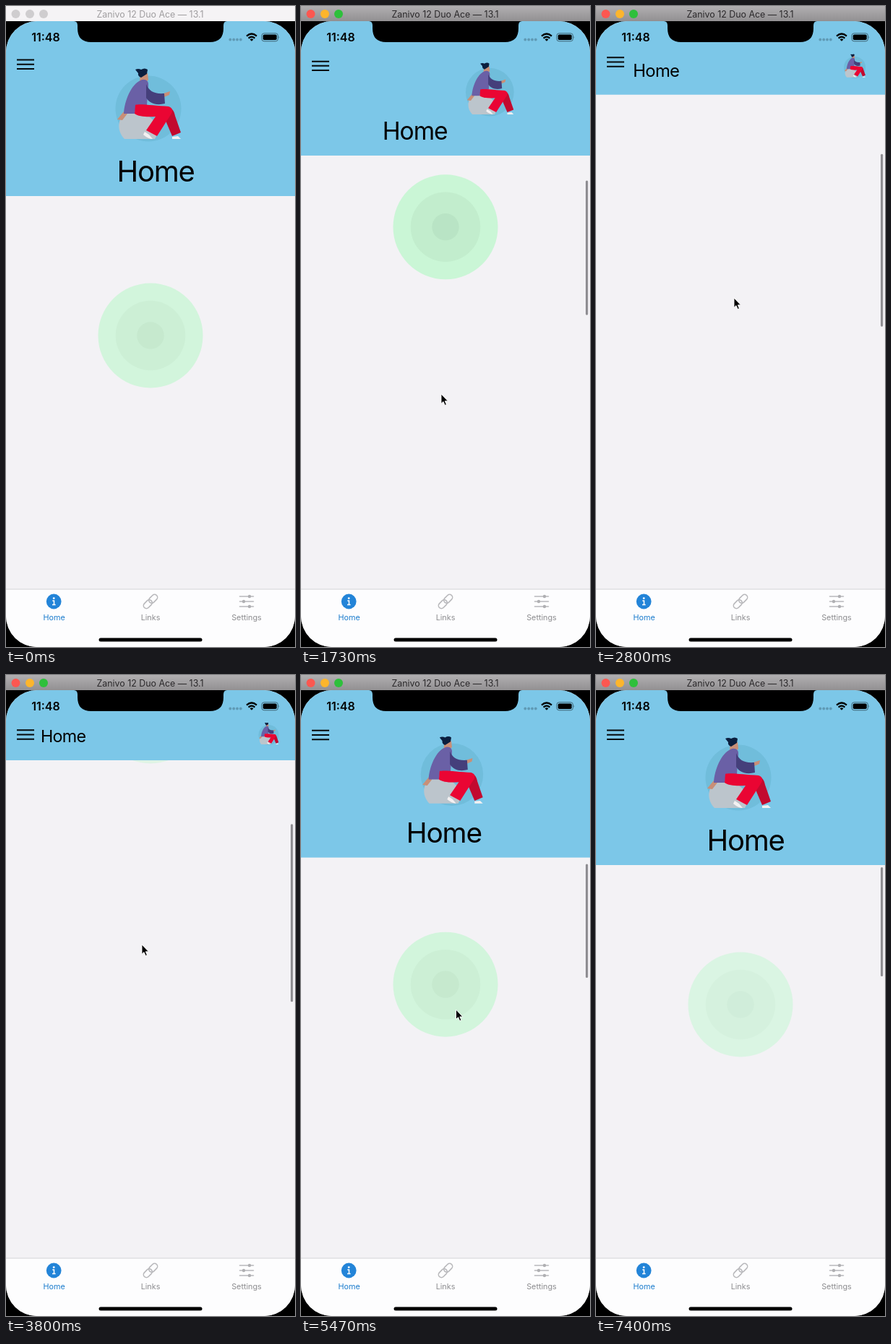
An HTML page for the animation above (7470 ms loop, 400x887 px).

```html
<!DOCTYPE html>
<html lang="en">
<head>
<meta charset="utf-8">
<title>Collapsing header</title>
<style>
  html, body { margin: 0; width: 100%; height: 100%; overflow: hidden; background: #000; }
  svg { display: block; width: 100vw; height: 100vh; font-family: Inter, Roboto, sans-serif; }
  .mid { text-anchor: middle; }
  .tab { font-size: 10.8px; fill: #8c8c8f; }
  .line { fill: none; stroke: #b9b9bc; stroke-width: 1.6; stroke-linecap: round; }
</style>
</head>
<body>
<svg viewBox="0 0 400 887">
  <defs>
    <clipPath id="screen"><rect y="21" width="400" height="866" rx="43"/></clipPath>
    <linearGradient id="chrome" x2="0" y2="1">
      <stop stop-color="#b1afb1"/><stop offset="1" stop-color="#929092"/>
    </linearGradient>
  </defs>

  <!-- window title bar -->
  <rect id="bar" width="400" height="21"/>
  <g id="lights">
    <circle cx="13.5" cy="11" r="6"/><circle cx="33" cy="11" r="6"/><circle cx="52" cy="11" r="6"/>
  </g>
  <text id="caption" class="mid" x="199.5" y="15.5" font-size="12.4">Zanivo 12 Duo Ace — 13.1</text>

  <g clip-path="url(#screen)">
    <rect y="21" width="400" height="866" fill="#f3f2f5"/>
    <g id="pulse">
      <circle cx="200" fill="#96faaf"/>
      <circle cx="200" fill="#6e8c73"/>
      <circle cx="200" fill="#4b7359"/>
    </g>
    <rect id="thumb" x="394" width="3.2" rx="1.6" fill="#8f8e92"/>

    <!-- header -->
    <rect id="header" y="21" width="400" fill="#7cc7e8"/>
    <g id="art">
      <circle cx="197" cy="142" r="45.5" fill="#70bddb"/>
      <path fill="#bcc5cc" d="M164 184C152 172 154 152 170 147L195 151C210 160 212 175 206 184Z"/>
      <path fill="#c98f77" d="M163 146l5 3-7 9-7-1ZM218 121l9-3-1 5-7 3ZM186 93h10l1 9-4 4-8-1Z"/>
      <path fill="#0b1f3f" d="M179 88Q183 86 187 88Q192 85 196 88L195 94L187 99Q182 97 183 93Z"/>
      <path fill="#c20a2f" d="M222 140C230 140 233 146 234 152L242 175L230 180L218 152Z"/>
      <path fill="#6a60a6" d="M186 103C192 100 198 103 197 110L195 137H180L178 149H163C164 130 174 108 186 103Z"/>
      <path fill="#453f7b" d="M194 108C198 118 205 122 219 121L220 135C208 138 199 135 194 127Z"/>
      <path fill="#ea0533" d="M179 137C185 135 205 138 225 139C232 141 231 147 227 152L209 180L194 172L207 153C195 154 183 153 178 149Z"/>
      <path fill="#f4f1f2" d="M192 174l6 4 5 6q-6 0-13-6ZM230 181l8-1 4 4h-12Z"/>
    </g>
    <text id="title" letter-spacing="-.03em">Home</text>
    <path id="menu" d="M15-6.2h24M15 0h24M15 6.2h24" stroke="#05090b" stroke-width="2"/>

    <!-- status bar -->
    <path d="M94 21Q99 21 99 27V31Q99 50 118 50H282Q301 50 301 31V27Q301 21 306 21Z"/>
    <text class="mid" x="55" y="48.6" font-size="16" font-weight="600">11:48</text>
    <g fill="#5f9ab5">
      <circle cx="310.3" cy="46.5" r="1.9"/><circle cx="315.2" cy="46.5" r="1.9"/>
      <circle cx="320" cy="46.5" r="1.9"/><circle cx="324.8" cy="46.5" r="1.9"/>
    </g>
    <path d="M333 41.6Q340 35.4 347 41.6M335.6 44.6Q340 40.8 344.4 44.6" fill="none" stroke="#000" stroke-width="2.2"/>
    <path d="M337.6 46.2Q340 44.2 342.4 46.2L340 48.8Z"/>
    <rect x="354" y="37.8" width="22.4" height="11" rx="3.2" fill="none" stroke="#3f6677"/>
    <rect x="355.7" y="39.5" width="19" height="7.6" rx="1.8"/>
    <path d="M377.6 41.6q1.6 1.7 0 3.4Z" fill="#3f6677"/>

    <!-- tab bar -->
    <rect y="806.5" width="400" height="81" fill="#fdfdfe"/>
    <rect y="806.5" width="400" height="1" fill="#d2d2d5"/>
    <circle cx="66.2" cy="824" r="10.4" fill="#2384d8"/>
    <circle cx="66.2" cy="819.6" r="1.4" fill="#fff"/>
    <path d="M64.3 823h2.2v5.2M64 828.4h4.6" fill="none" stroke="#fff" stroke-width="1.5"/>
    <g class="line" transform="translate(200 824) rotate(-45)">
      <rect x="-12" y="-4" width="13.5" height="8" rx="4"/>
      <rect x="-1.5" y="-4" width="13.5" height="8" rx="4"/>
    </g>
    <path class="line" d="M323.5 817h19M323.5 824h19M323.5 831h19"/>
    <g fill="#b0b0b3">
      <circle cx="337" cy="817" r="2.2"/><circle cx="329" cy="824" r="2.2"/><circle cx="337" cy="831" r="2.2"/>
    </g>
    <g class="mid tab">
      <text x="66.7" y="850" style="fill:#1b7ccd">Home</text>
      <text x="200" y="850">Links</text>
      <text x="333" y="850">Settings</text>
    </g>
    <rect x="128.5" y="874.5" width="143" height="5" rx="2.5"/>
  </g>
  <path id="cursor" d="M0 0V13.4L3 10.6L5.2 15.6L7.4 14.6L5.3 9.9H9.4Z" stroke="#fff" stroke-width=".9"/>
</svg>
<script>
const $ = id => document.getElementById(id);
const set = (el, attrs) => { for (const k in attrs) el.setAttribute(k, attrs[k]); };
const mix = (a, b, p) => a + (b - a) * p;
const clamp = (v, lo = 0, hi = 1) => Math.min(hi, Math.max(lo, v));
const mod = (a, n) => ((a % n) + n) % n;

const LOOP = 7470, WAKE = 1000, LEAVE = 7300, PULSE = 1825, BOB = 2000;

// [time, value] keys
const SCROLL = [[1000, 0], [1730, 150], [2800, 376], [3300, 406], [3800, 406],
                [4400, 385], [4930, 198], [5470, 28], [5800, 0], [7470, 0]];
const MOUSE_X = [[1000, 196], [1730, 194], [2800, 191], [3800, 188], [4930, 210], [5470, 214.5], [7200, 228]];
const MOUSE_Y = [[1000, 622], [1730, 537], [2800, 404], [3800, 373], [4400, 290], [4930, 358.5], [5470, 463], [5800, 467], [7200, 467]];

// monotone cubic through the keys
function follow(keys, t) {
  const last = keys.length - 1;
  if (t <= keys[0][0]) return keys[0][1];
  if (t >= keys[last][0]) return keys[last][1];
  const i = keys.findIndex(k => k[0] > t) - 1;
  const slope = j => (keys[j + 1][1] - keys[j][1]) / (keys[j + 1][0] - keys[j][0]);
  const tangent = j => {
    if (j <= 0 || j >= last) return 0;
    const a = slope(j - 1), b = slope(j);
    return a * b <= 0 ? 0 : 2 * a * b / (a + b);
  };
  const [t0, v0] = keys[i], [t1, v1] = keys[i + 1];
  const d = t1 - t0, u = (t - t0) / d, w = 1 - u;
  return v0 * (1 + 2 * u) * w * w + v1 * u * u * (3 - 2 * u)
       + d * u * w * (tangent(i) * w - tangent(i + 1) * u);
}

function drawWindow(active) {
  set($('bar'), { fill: active ? 'url(#chrome)' : '#f5f3f5' });
  set($('caption'), { fill: active ? '#2b292b' : '#a09ea0' });
  const colors = active ? ['#fc5750', '#fdb52c', '#2ec03b'] : Array(3).fill('#cfcdcf');
  [...$('lights').children].forEach((c, i) => set(c, { fill: colors[i] }));
}

function drawHeader(height, t) {
  const p = (263 - height) / 145;
  const size = mix(40, 23.3, p);
  set($('header'), { height: height - 21 });
  set($('title'), { 'font-size': size, x: mix(157, 50, p) - size * .09, y: mix(243, 93, p) });
  set($('art'), { transform:
    `translate(${mix(197, 363.5, p)} ${mix(142, 83, p)}) scale(${mix(1, .308, p)}) translate(-197 -142)` });
  const bob = 80 + 3.2 * Math.cos((t - 1580) / BOB * 2 * Math.PI);
  set($('menu'), { transform: `translate(0 ${bob})` });
}

function drawPulse(cy, t) {
  const u = mod(t - 630, PULSE);
  const fade = clamp(1 - (u - 510) / 1070);
  const shade = fade ** 1.6;
  const rings = [[72.5, 900, fade], [48.2, 734, .32 * shade], [18.7, 300, .26 * shade]];
  rings.forEach(([r, grow, opacity], i) =>
    set($('pulse').children[i], { cy, r: r * clamp(u / grow), opacity }));
}

function draw(t) {
  const scroll = follow(SCROLL, t);
  const height = Math.max(118, 263 - .373 * scroll);
  const awake = t >= WAKE;
  drawWindow(awake);
  drawHeader(height, t);
  drawPulse(456 - scroll, t);
  set($('thumb'), { y: height + 3 + .21 * scroll, height: 151 + .234 * scroll, opacity: +awake });
  set($('cursor'), {
    transform: `translate(${follow(MOUSE_X, t)} ${follow(MOUSE_Y, t)})`,
    opacity: +(awake && t < LEAVE)
  });
}

const start = performance.now();
function tick() {
  draw((performance.now() - start) % LOOP);
  requestAnimationFrame(tick);
}
tick();
</script>
</body>
</html>
```
